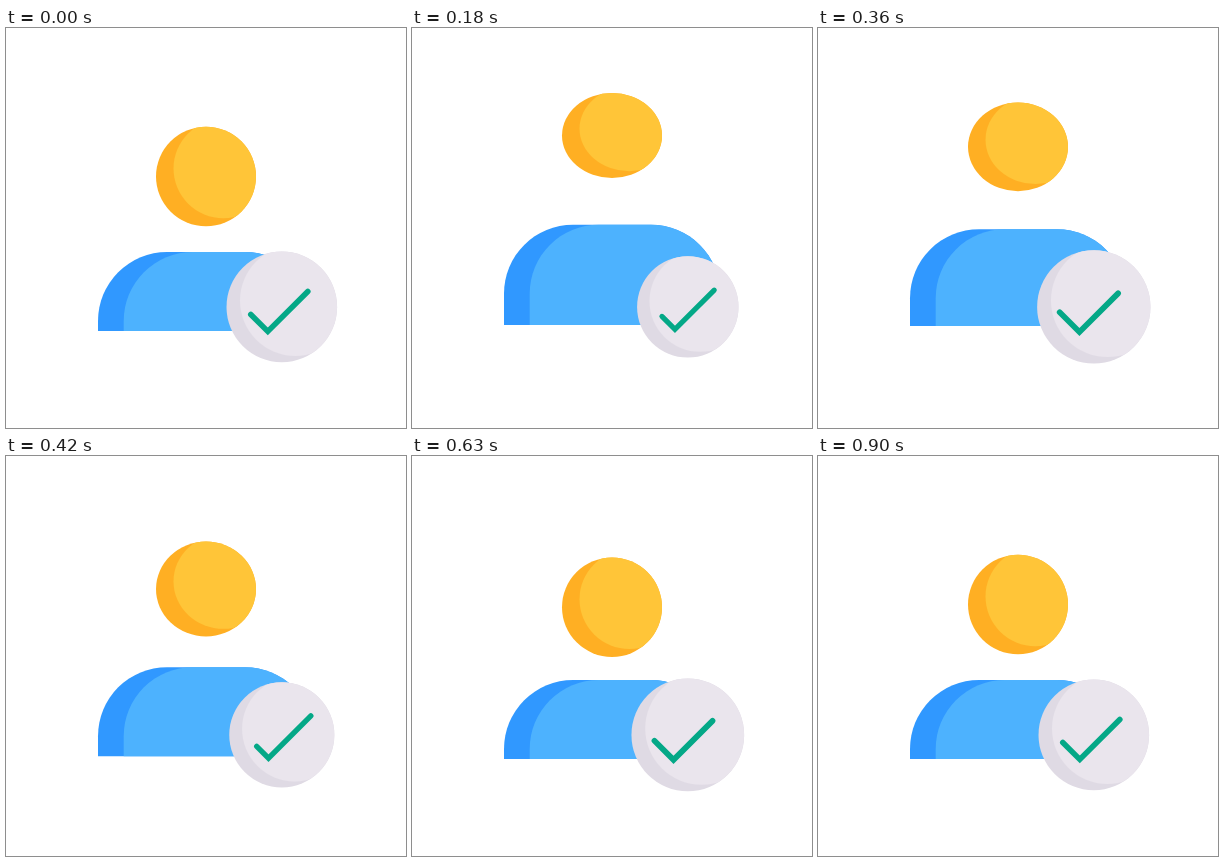
These frames come from a looping animation (400x400 px, 2.96 s). An HTML page with a canvas:

```html
<!DOCTYPE html>
<html lang="en">
<head>
<meta charset="utf-8">
<title>Verified user</title>
<style>
html, body { margin: 0; width: 100%; height: 100%; overflow: hidden; background: #fff; }
canvas { display: block; width: 400px; height: 400px; }
</style>
</head>
<body>
<canvas id="stage" width="400" height="400"></canvas>
<script>
const ctx = document.getElementById('stage').getContext('2d');
const LOOP = 2960, STEP = 30, PEAK = 300, SETTLED = 900;

// Progress from a to b, clamped to 0..1.
const ramp = (a, b, t) => Math.min(1, Math.max(0, (t - a) / (b - a)));

function smooth(a, b, t) {
  const u = ramp(a, b, t);
  return u * u * (3 - 2 * u);
}

const easeOut = u => 1 - (1 - u) ** 3;

// Body: 0 at rest, 1 at the top of the hop.
const rise = t => Math.sin(Math.PI / 2 * ramp(0, 250, t)) ** 1.2;
const bodyLift = t => 30.8 * rise(t) * (1 - smooth(270, 540, t));

// The head leaps faster, lands a little low, then recovers.
function headLift(t) {
  return 41 * easeOut(ramp(0, 200, t)) - 43.8 * smooth(270, 540, t)
    + 2.8 * smooth(600, SETTLED, t);
}
const headSquash = t => 8.2 * rise(t) * (1 - smooth(270, 500, t));

// Sink by dip, swell to peak, then ring out.
function wobble(t, dip, peak) {
  if (t < PEAK) return (dip + peak) * smooth(170, PEAK, t) - dip * smooth(0, 150, t);
  const fade = (1 - ramp(PEAK, SETTLED, t)) ** 1.8;
  return peak * fade * Math.cos(2 * Math.PI * (t - PEAK) / 303);
}

function disc(r, color, x = 0, y = 0) {
  ctx.beginPath();
  ctx.arc(x, y, r, 0, Math.PI * 2);
  ctx.fillStyle = color;
  ctx.fill();
}

// A disc with a crescent of shade on its lower left.
function shadedDisc(r, light, shade, dx, dy) {
  disc(r, shade);
  ctx.save();
  ctx.clip();
  disc(r, light, dx, dy);
  ctx.restore();
}

function drawHead(t) {
  ctx.save();
  ctx.translate(200, 148.5 - headLift(t));
  ctx.scale(1, (49.7 - headSquash(t)) / 50);
  shadedDisc(50, '#ffc538', '#ffaf23', 17.5, -8);
  ctx.restore();
}

function shoulders(left, top, bottom, color) {
  const r = 69, right = 308;
  ctx.beginPath();
  ctx.moveTo(left, bottom);
  ctx.lineTo(left, top + r);
  ctx.arcTo(left, top, left + r, top, r);
  ctx.lineTo(right - r, top);
  ctx.arcTo(right, top, right, top + r, r);
  ctx.lineTo(right, bottom);
  ctx.closePath();
  ctx.fillStyle = color;
  ctx.fill();
}

function drawBody(t) {
  const lift = bodyLift(t), top = 224 - lift, bottom = 303 - 0.22 * lift;
  shoulders(92, top, bottom, '#3098ff');
  shoulders(117.7, top, bottom, '#4db2fe');
}

function drawBadge(t) {
  const size = 1 + wobble(t, 0.086, 0.094);
  // The tick slides along its own corner, keeping its length.
  const arm = 17 + wobble(t, 3, 8.6), rest = 57 - arm;
  ctx.save();
  ctx.translate(275.8, 278.9);
  ctx.scale(size, size);
  shadedDisc(55.3, '#eae5ed', '#dfdae4', 13.5, -6.3);
  ctx.beginPath();
  ctx.moveTo(-14 - arm, 24.5 - arm);
  ctx.lineTo(-14, 24.5);
  ctx.lineTo(-14 + rest, 24.5 - rest);
  ctx.lineWidth = 5.6;
  ctx.lineCap = 'round';
  ctx.lineJoin = 'miter';
  ctx.strokeStyle = '#04a887';
  ctx.stroke();
  ctx.restore();
}

function render(ms) {
  const t = Math.min(SETTLED, Math.floor((ms % LOOP) / STEP) * STEP);
  ctx.fillStyle = '#fff';
  ctx.fillRect(0, 0, 400, 400);
  drawHead(t);
  drawBody(t);
  drawBadge(t);
}

const start = performance.now();
function tick() {
  render(performance.now() - start);
  requestAnimationFrame(tick);
}
tick();
</script>
</body>
</html>
```
